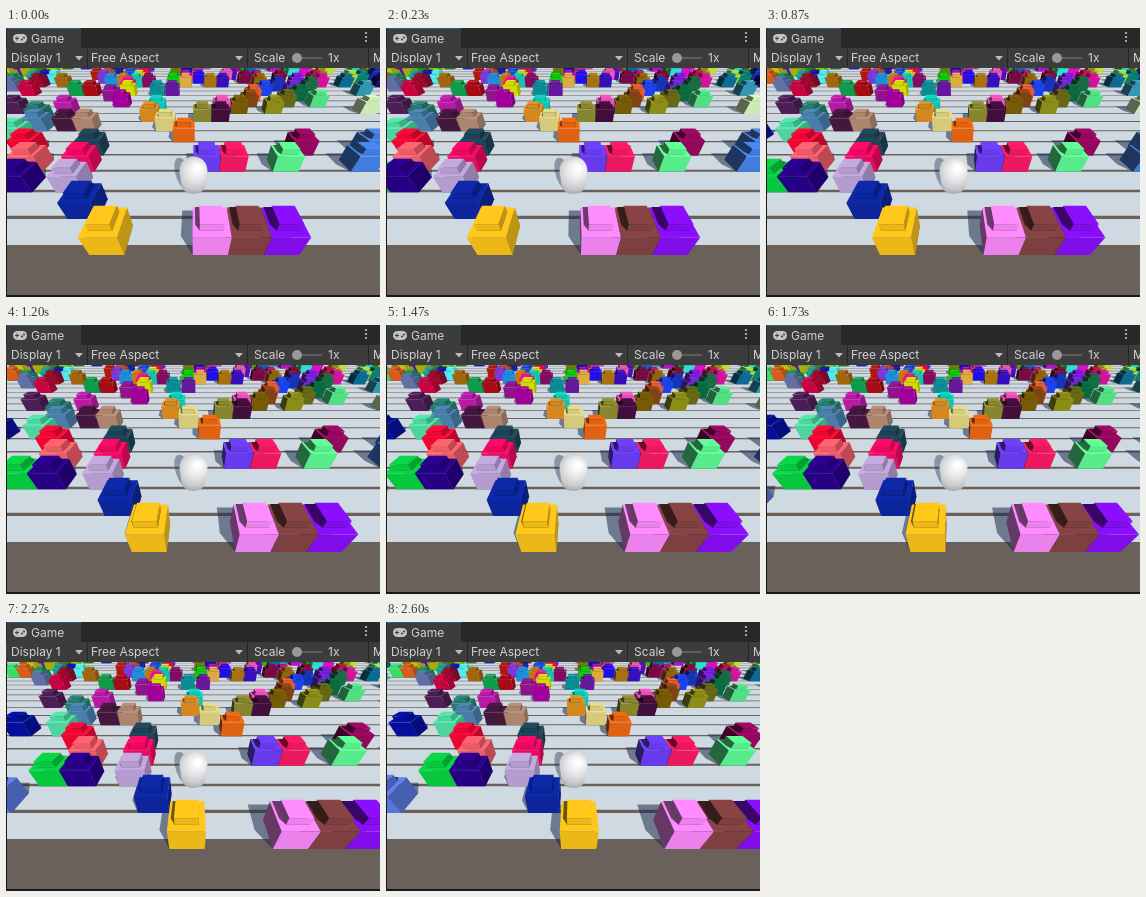
Recreate the animation shown at these times as an HTML page with a canvas. Size 374 px wide and 269 px high, loop 2630 ms.

```html
<!DOCTYPE html>
<html lang="en">
<head>
<meta charset="utf-8">
<title>Game view</title>
<style>
  html, body { margin: 0; width: 100%; height: 100%; overflow: hidden; background: #191919; }
  canvas { display: block; width: 374px; height: 269px; }
</style>
</head>
<body>
<canvas id="stage" width="374" height="269"></canvas>
<script>
const ctx = document.getElementById('stage').getContext('2d');
const LOOP = 2.63, SPEED = 0.98;
const CX = 187, CY = 153.5, FOCAL = 196.6;
const PITCH = 0.7077, SIN = Math.sin(PITCH), COS = Math.cos(PITCH);
const DEPTH = 5.46, DROP = 2.042, STRIDE = 1.257;
const SHADOW_X = -0.42, SHADOW_Z = 0.727;
const PLAYER_ROW = 2;

// Row (0 is nearest), centre at the start of the loop, colour.
const boxes = [
  [0, -2.39, '#ffc81a'], [0, 0.48, '#ff8cff'], [0, 1.47, '#884444'], [0, 2.46, '#8c0eff'],
  [1, -3.46, '#0d28a8'], [1, -8.43, '#5f80ee'],
  [2, -4.3, '#c4aae0'], [2, -6.1, '#2b0092'], [2, -7.1, '#08d845'],
  [3, 0.5, '#7040ff'], [3, 1.5, '#ff1a68'], [3, 3.53, '#60ff98'], [3, 6.5, '#4888f0'],
  [3, -4.25, '#ff0a68'], [3, -6.22, '#ff6470'],
  [4, -7.05, '#ff0838'], [4, -4.3, '#21485c'], [4, 4.6, '#a00864'], [4, 7.6, '#4b86ea'],
  [5, -0.42, '#f46a12'], [5, -8.3, '#54e8ae'], [5, -10.3, '#0710a8'],
  [6, -7.95, '#5088b8'], [6, -6.46, '#4a1a42'], [6, -5.46, '#bc9078'], [6, -1.4, '#e8dc84'],
  [7, -2.38, '#e89222'], [7, 0.5, '#929232'], [7, 1.5, '#461040'], [7, -8.6, '#2a8878'],
  [8, -7.6, '#c81cb4'], [8, -10.65, '#54205c'], [8, 4.8, '#98981a'], [8, 2.75, '#806206'],
  [8, -2.15, '#08d8c8'], [8, 10.5, '#dcffc0'], [8, 1.7, '#ff50c8'],
  [9, -4.6, '#b000a8'], [9, 8, '#58f290'], [9, 6, '#70701a'], [9, 3.6, '#8a4a16'],
  [10, -5.6, '#9c1698'], [10, 4.1, '#ff6030'], [10, 7.2, '#087444'],
  [11, -12, '#d80444'], [11, -8.5, '#10a850'], [11, -7.4, '#b80c18'], [11, -4.7, '#e0f000'],
  [11, -2.6, '#0c98a0'], [11, -1.5, '#7018ac'], [11, 5.2, '#1e48ff'], [11, 7.2, '#7430dc'],
  [11, 12.4, '#36a4c0'],
  [12, -5, '#ff10a0'], [12, 6.5, '#1838c8'], [12, 9, '#18784a'], [12, -14, '#6c78b4'],
  [14, -11.8, '#58ffff'], [14, 0.5, '#2410ff'], [15, 3, '#ff60c0']
];

function seeded(seed) {
  return () => {
    seed = (seed * 1664525 + 1013904223) % 4294967296;
    return seed / 4294967296;
  };
}

const random = seeded(71);
for (let row = 13; row < 23; row++) {
  for (let x = -26; x < 22; x++) {
    const hue = Math.floor(random() * 360), light = 28 + Math.floor(random() * 34);
    if (random() < 0.34) boxes.push([row, x + 0.4, hslToHex(hue, 0.85, light / 100)]);
  }
}

function hslToHex(h, s, l) {
  const a = s * Math.min(l, 1 - l);
  return '#' + [0, 8, 4].map(n => {
    const k = (n + h / 30) % 12;
    const v = l - a * Math.max(-1, Math.min(k - 3, 9 - k, 1));
    return Math.round(v * 255).toString(16).padStart(2, '0');
  }).join('');
}

function shade(hex, amount) {
  const parts = [1, 3, 5].map(i => Math.round(parseInt(hex.slice(i, i + 2), 16) * amount));
  return `rgb(${parts})`;
}

const spread = row => 1 + Math.min(row, 3) * 0.037;

function project(x, y, z) {
  const d = DEPTH + z * COS - y * SIN;
  return [CX + FOCAL * x / d, CY + FOCAL * (DROP - z * SIN - y * COS) / d];
}

function addPolygon(points) {
  points.forEach((p, i) => ctx[i ? 'lineTo' : 'moveTo'](...project(...p)));
  ctx.closePath();
}

function face(points, color) {
  ctx.beginPath();
  addPolygon(points);
  ctx.fillStyle = color;
  ctx.fill();
}

function shadowShape({ x0, x1, y0, y1, z0, z1 }) {
  const sx = SHADOW_X * (y1 - y0), sz = SHADOW_Z * (y1 - y0);
  return [[x0, y0, z0], [x0 + sx, y0, z0 + sz], [x0 + sx, y0, z1 + sz],
          [x1 + sx, y0, z1 + sz], [x1, y0, z1], [x1, y0, z0]];
}

function drawBlock({ x0, x1, y0, y1, z0, z1 }, color) {
  const side = x => [[x, y0, z0], [x, y1, z0], [x, y1, z1], [x, y0, z1]];
  if (x0 > 0) face(side(x0), shade(color, 0.4));
  if (x1 < 0) face(side(x1), shade(color, 0.74));
  face([[x0, y0, z0], [x1, y0, z0], [x1, y1, z0], [x0, y1, z0]], shade(color, 0.92));
  face([[x0, y1, z0], [x1, y1, z0], [x1, y1, z1], [x0, y1, z1]], color);
}

function makeCar([row, start, color], time) {
  const q = row ? 0.9 : 1, w = spread(row);
  const x = (start + SPEED * time) * w, z = row * STRIDE;
  const body = { x0: x - 0.49 * w, x1: x + 0.49 * w, y0: 0, y1: 0.85 * q, z0: z, z1: z + q };
  const cabin = { x0: x - 0.31 * w, x1: x + 0.31 * w, y0: body.y1, y1: 1.12 * q,
                  z0: z + 0.2 * q, z1: z + 0.82 * q };
  return { row, x, color, body, cabin };
}

function drawCar({ body, cabin, color }) {
  drawBlock(body, color);
  face(shadowShape(cabin), shade(color, 0.42));
  drawBlock(cabin, color);
}

function drawGround() {
  ctx.fillStyle = '#6a615b';
  ctx.fillRect(1, 40, 373, 227);
  for (let row = 0; row < 26; row++) {
    const near = (row + (row ? 0.11 : 0.25)) * STRIDE, far = (row + 1) * STRIDE;
    face([[-60, 0, near], [60, 0, near], [60, 0, far], [-60, 0, far]], '#cfd9e1');
  }
}

function drawPlayer() {
  const g = ctx.createRadialGradient(192, 140, 2, 188, 146, 23);
  g.addColorStop(0, '#ffffff');
  g.addColorStop(0.35, '#e9e9ea');
  g.addColorStop(0.7, '#c8cacd');
  g.addColorStop(1, '#92979e');
  ctx.fillStyle = g;
  ctx.beginPath();
  ctx.moveTo(173.5, 143);
  ctx.bezierCurveTo(173.5, 123.5, 201.5, 123.5, 201.5, 143);
  ctx.lineTo(199.5, 157);
  ctx.bezierCurveTo(198, 169, 177, 169, 175.5, 157);
  ctx.closePath();
  ctx.fill();
}

function drawScene(time) {
  ctx.save();
  ctx.beginPath();
  ctx.rect(1, 40, 373, 227);
  ctx.clip();
  drawGround();
  const cars = boxes.map(box => makeCar(box, time));
  ctx.beginPath();
  cars.forEach(car => addPolygon(shadowShape(car.body)));
  ctx.fillStyle = 'rgba(30,45,75,.55)';
  ctx.fill();
  ctx.fillStyle = 'rgba(30,45,75,.4)';
  ctx.beginPath();
  ctx.ellipse(178, 147, 8, 18, -0.35, 0, 7);
  ctx.fill();

  cars.sort((a, b) => b.row - a.row || Math.abs(b.x) - Math.abs(a.x));
  const split = cars.findIndex(car => car.row < PLAYER_ROW);
  cars.slice(0, split).forEach(drawCar);
  drawPlayer();
  cars.slice(split).forEach(drawCar);
  ctx.restore();
}

function rect(x, y, w, h, color) {
  ctx.fillStyle = color;
  ctx.fillRect(x, y, w, h);
}

function disc(x, y, r, color) {
  ctx.fillStyle = color;
  ctx.beginPath();
  ctx.arc(x, y, r, 0, 7);
  ctx.fill();
}

function arrow(x) {
  ctx.fillStyle = '#bdbdbd';
  ctx.beginPath();
  ctx.moveTo(x - 4, 28);
  ctx.lineTo(x + 4, 28);
  ctx.lineTo(x, 32.5);
  ctx.fill();
}

function drawToolbar() {
  rect(0, 0, 374, 269, '#191919');
  rect(0, 0, 374, 20, '#282828');
  rect(1, 0, 74, 20, '#3c3c3c');
  rect(1, 0, 74, 1, '#2c5d87');
  rect(0, 20, 374, 20, '#3c3c3c');
  [81, 241, 362].forEach(x => rect(x, 20, 1, 20, '#262626'));

  ctx.fillStyle = '#c4c4c4';
  ctx.beginPath();
  ctx.roundRect(7, 6, 14, 9, 4.5);
  ctx.fill();
  rect(9, 10, 4, 1, '#3c3c3c');
  rect(10.5, 8.5, 1, 4, '#3c3c3c');
  disc(16, 11.5, 1, '#3c3c3c');
  disc(18, 9.5, 1, '#3c3c3c');
  [5, 9, 13].forEach(y => disc(360, y, 1.1, '#c4c4c4'));

  ctx.font = '12px Inter, Roboto, sans-serif';
  ctx.textBaseline = 'alphabetic';
  ctx.fillStyle = '#d2d2d2';
  [['Game', 25, 15], ['Display 1', 5, 34], ['Free Aspect', 85, 34],
   ['Scale', 248, 34], ['1x', 322, 34], ['M', 367, 34]].forEach(label => ctx.fillText(...label));
  arrow(73);
  arrow(233);
  rect(290, 29, 26, 2, '#5e5e5e');
  disc(291, 30, 5, '#999999');
}

function frame() {
  drawToolbar();
  drawScene((performance.now() / 1000) % LOOP);
  requestAnimationFrame(frame);
}
frame();
</script>
</body>
</html>
```
